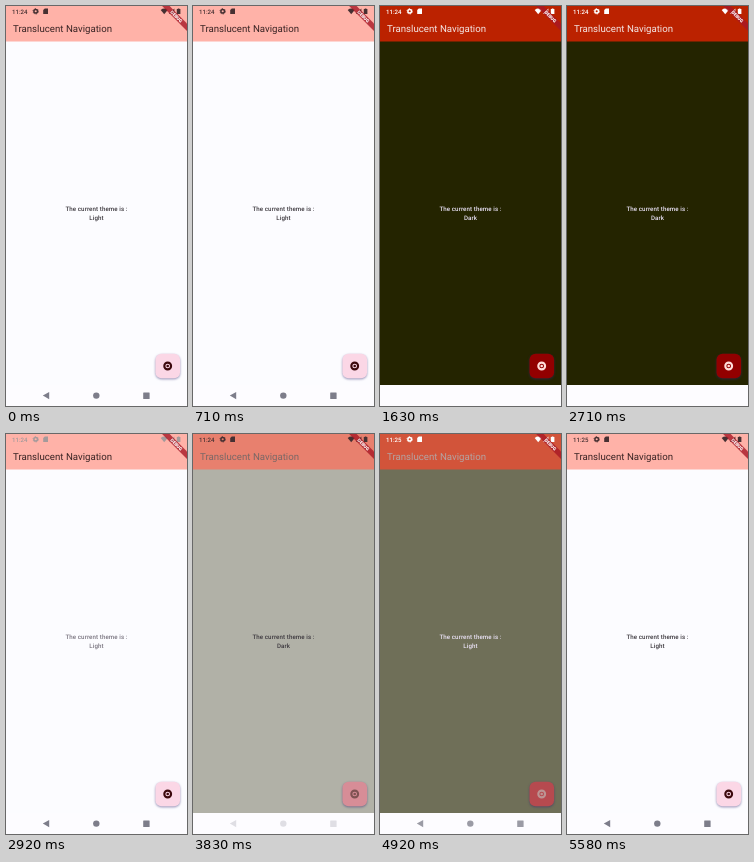
These frames come from a looping animation (181x400 px, 5680 ms). An HTML page:

```html
<!DOCTYPE html>
<html lang="en">
<head>
<meta charset="utf-8">
<title>Translucent Navigation</title>
<style>
html, body { margin: 0; width: 100%; height: 100%; overflow: hidden; background: #fdfcff; }
svg { display: block; width: 181px; height: 400px; font-family: Roboto, sans-serif; text-rendering: geometricPrecision; }
[data-dark] { fill: currentColor; }
.ring { fill: none; stroke: currentColor; }
#fab { filter: drop-shadow(0 1.2px .8px rgba(50, 40, 110, .5)); }
</style>
</head>
<body>
<svg viewBox="0 0 181 400">
  <rect data-light="#fcfcff" data-dark="#242400" width="181" height="379"/>
  <rect data-light="#ffb2a8" data-dark="#bb2200" width="181" height="35.5"/>
  <text data-light="#3a2424" data-dark="#f4e6e4" x="7" y="25.6" font-size="9.69">Translucent Navigation</text>

  <g data-light="#463032" data-dark="#ffffff" data-phase="status">
    <text id="clock" x="6" y="7.6" font-size="6.1" font-weight="500">11:24</text>
    <circle class="ring" cx="29.7" cy="5.3" r="1.8" stroke-width="1.5"/>
    <circle class="ring" cx="29.7" cy="5.3" r="2.7" stroke-width=".8" stroke-dasharray="1.4 1.43"/>
    <path d="M38.8 2.5H42V8H37.2V4.1Z"/>
    <path d="M154.7 3.9Q158.2 1.3 161.7 3.9L158.2 8.2Z"/>
    <path d="M168.4 2.5V8.1H162.8Z"/>
    <path d="M170.8 3.1H171.8V2.4H173.4V3.1H174.4V8.1H170.8Z"/>
  </g>

  <g data-light="#3c383e" data-dark="#ece4f8" data-phase="copy"
     font-size="6.16" font-weight="500" letter-spacing=".09" text-anchor="middle">
    <text x="90.5" y="205.1">The current theme is :</text>
    <text id="label" x="90.5" y="213.7">Light</text>
  </g>

  <rect id="fab" data-light="#fbd7e6" data-dark="#920000" x="149.5" y="347.7" width="24.6" height="24.6" rx="6"/>
  <g data-light="#3c080c" data-dark="#ffdeda">
    <circle class="ring" cx="161.7" cy="360" r="3.4" stroke-width="2.1"/>
    <circle cx="161.7" cy="360" r="1.3"/>
  </g>

  <rect y="379" width="181" height="21" fill="#fdfcff"/>
  <g data-light="#7d7d8a" data-dark="#fdfcff" data-phase="nav">
    <path d="M43.2 386V393.2L36.8 389.6Z"/>
    <circle cx="90.3" cy="389.6" r="3.2"/>
    <rect x="137.2" y="386.5" width="6.4" height="6.4" rx=".5"/>
  </g>

  <g transform="translate(181 0) rotate(45)">
    <rect x="-18" y="12.3" width="36" height="5.3" fill="#a81826" fill-opacity=".8"/>
    <text y="16.6" font-size="4.6" font-weight="900" text-anchor="middle" fill="#fff">DEBUG</text>
  </g>
</svg>
<script>
const LOOP = 5680, LEAD = 68;
const toggles = [1250, 2760, 3830, 4920];   // dark, light, dark, light
const phases = {
  theme: { delay: 0, span: 200 },
  copy: { delay: 100, span: 200 },
  status: { delay: 180, span: 100 },
  nav: { delay: 0, span: 90 }
};
const parts = document.querySelectorAll('[data-dark]');
const label = document.getElementById('label');
const clock = document.getElementById('clock');

function draw(t) {
  const past = toggles.filter(at => at <= t);
  const isDark = past.length % 2 === 1;
  const age = past.length ? t - past.at(-1) + LEAD : LOOP;
  for (const part of parts) {
    const { light, dark, phase = 'theme' } = part.dataset;
    const { delay, span } = phases[phase];
    const p = Math.max(0, Math.min(1, (age - delay) / span));
    const share = 100 * (isDark ? p : 1 - p);
    part.style.color = `color-mix(in srgb, ${dark} ${share}%, ${light})`;
  }
  label.textContent = isDark ? 'Dark' : 'Light';
  clock.textContent = t < 4780 ? '11:24' : '11:25';
}

const start = performance.now();
function tick() {
  draw((performance.now() - start) % LOOP);
  requestAnimationFrame(tick);
}
tick();
</script>
</body>
</html>
```
